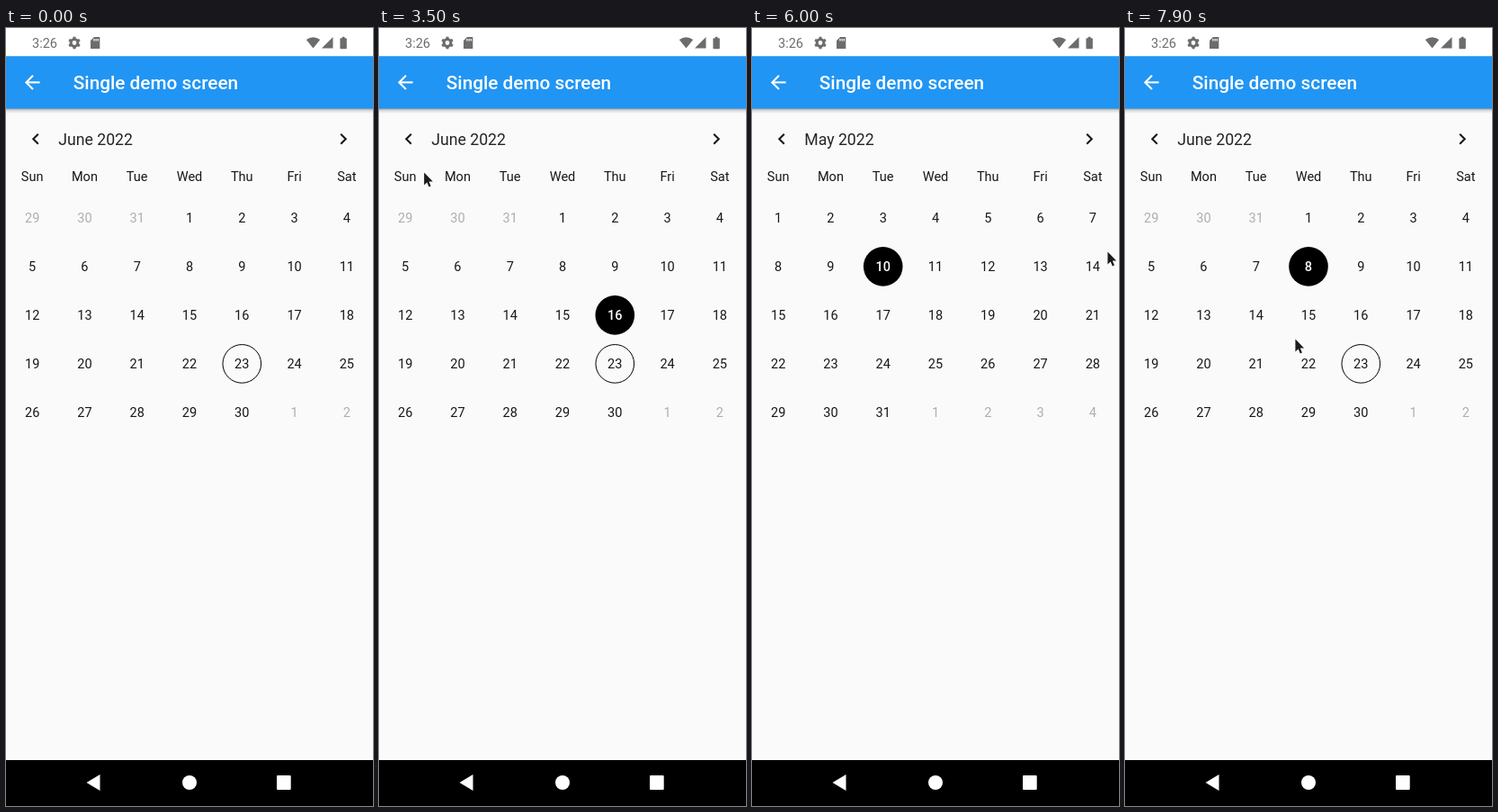
Recreate the animation shown at these times as an HTML page with a canvas. Size 408x864 px, loop 8000 ms.

```html
<!DOCTYPE html>
<html lang="en">
<head>
<meta charset="utf-8">
<title>Calendar demo</title>
<style>
html, body { margin: 0; width: 100%; height: 100%; overflow: hidden; background: #fafafa; }
canvas { display: block; width: 408px; height: 864px; }
</style>
</head>
<body>
<canvas id="stage"></canvas>
<script>
const W = 408, H = 864, LOOP = 8000, STEP = 100;
const DP = W / 392.7;
const COL = W / 7, ROW = 52 * DP, FIRST_ROW = 210.8, RADIUS = 21 * DP;
const BAR_TOP = 31.3, BAR_HEIGHT = 56 * DP, BAR_MID = BAR_TOP + BAR_HEIGHT / 2;
const HEADER_MID = 123.3, NAV_MID = 838;
const INK = '#181818', GREY = '#aeaeae', STATUS = '#6c6c6c', PAPER = '#fafafa';
const WEEK = ['Sun', 'Mon', 'Tue', 'Wed', 'Thu', 'Fri', 'Sat'];
const MONTHS = ['May', 'June', 'July'];
const TAP_SLIDE = 3783, DRAG = 6000, RELEASE = 6300;

const canvas = document.getElementById('stage');
const ctx = canvas.getContext('2d');
const ratio = window.devicePixelRatio || 1;
canvas.width = W * ratio;
canvas.height = H * ratio;

// Pointer strokes; bend is the sideways bulge relative to the stroke's length
const ENTER = { x: 398, y: 336 };
const STROKES = [
  { from: 300, to: 600, x: 146, y: 260, bend: 0 },
  { from: 1400, to: 2000, x: 262, y: 322, bend: 0.8 },
  { from: 2600, to: 3000, x: 112, y: 277, bend: -0.3 },
  { from: 3200, to: 3600, x: 29, y: 121, bend: 0 },
  { from: 4100, to: 4700, x: 136, y: 264, bend: -2.1 },
  { from: 5200, to: 5800, x: 395, y: 248, bend: 0.3 },
  { from: DRAG, to: RELEASE, x: 151, y: 437, bend: 0.1 },
  { from: RELEASE, to: 6700, x: 257, y: 274, bend: 0 },
  { from: 6700, to: 7100, x: 204, y: 267, bend: 0 },
  { from: 7500, to: 7900, x: 189, y: 345, bend: 0 }
];

const PICKS = [
  { month: 1, day: 7, on: 1050, off: 2150 },
  { month: 1, day: 16, on: 2150, off: 4750 },
  { month: 0, day: 10, on: 4750, off: 7300 },
  { month: 1, day: 8, on: 7300, off: LOOP }
];

const clamp = v => Math.max(0, Math.min(1, v));

function pointerAt(t) {
  let p = ENTER;
  for (const s of STROKES) {
    if (t < s.from) break;
    const u = clamp((t - s.from) / (s.to - s.from));
    const dx = s.x - p.x, dy = s.y - p.y;
    const bulge = 2 * u * (1 - u) * s.bend;
    p = { x: p.x + dx * u - dy * bulge, y: p.y + dy * u + dx * bulge };
  }
  return p;
}

// cubic-bezier(0, 0, .58, 1)
function easeOut(u) {
  let lo = 0, hi = 1;
  for (let i = 0; i < 20; i++) {
    const s = (lo + hi) / 2;
    if (1.74 * s * s * (1 - s) + s ** 3 < u) lo = s; else hi = s;
  }
  return 3 * lo * lo - 2 * lo ** 3;
}

// Month position: a button slide, then a drag released into a damped spring
function pageAt(t) {
  if (t < DRAG) return 1 - easeOut(clamp((t - TAP_SLIDE) / 300));
  const grabbed = pointerAt(DRAG).x;
  if (t <= RELEASE) return (grabbed - pointerAt(t).x) / W;
  const left = W - grabbed + pointerAt(RELEASE).x;
  const s = (t - RELEASE) / 1000, swing = 131;
  const rest = (left + swing) * Math.exp(-22 * s) - swing * Math.exp(-9.07 * s);
  return 1 - (Math.abs(rest) > 0.1 ? rest / W : 0);
}

// Centres text on y the way a line box does
function text(str, x, y, dp, color, weight = 400, align = 'left') {
  const size = dp * DP;
  ctx.font = `${weight} ${size}px Roboto, sans-serif`;
  ctx.textAlign = align;
  ctx.fillStyle = color;
  ctx.fillText(str, x, y + size * 0.345);
}

function disc(x, y, r, color) {
  ctx.beginPath();
  ctx.arc(x, y, r, 0, Math.PI * 2);
  ctx.fillStyle = color;
  ctx.fill();
}

function rect(x, y, w, h, color, r = 0) {
  ctx.beginPath();
  ctx.roundRect(x, y, w, h, r);
  ctx.fillStyle = color;
  ctx.fill();
}

function trace(...points) {
  ctx.beginPath();
  points.forEach(([x, y]) => ctx.lineTo(x, y));
}

function polygon(color, ...points) {
  trace(...points);
  ctx.fillStyle = color;
  ctx.fill();
}

function line(color, width, ...points) {
  trace(...points);
  ctx.strokeStyle = color;
  ctx.lineWidth = width;
  ctx.stroke();
}

// dir -1 points left, 1 points right
function chevron(x, y, arm, dir, color) {
  line(color, 2 * DP, [x - dir * arm, y - arm], [x, y], [x - dir * arm, y + arm]);
}

function statusIcons(y) {
  const x = 76;
  ctx.beginPath();
  ctx.arc(x, y, 3.9, 0, Math.PI * 2);
  ctx.strokeStyle = STATUS;
  ctx.lineWidth = 3;
  ctx.stroke();
  for (let i = 0; i < 6; i++) {
    const a = (i + 0.5) * Math.PI / 3, c = Math.cos(a), s = Math.sin(a);
    line(STATUS, 3, [x + 4.5 * c, y + 4.5 * s], [x + 6.8 * c, y + 6.8 * s]);
  }

  polygon(STATUS, [94, y - 2.5], [98, y - 6.5], [104.3, y - 6.5], [104.3, y + 6.5], [94, y + 6.5]);
  for (let i = 0; i < 3; i++) rect(97.3 + i * 2.2, y - 4.5, 1.2, 2.6, '#fff');

  const tip = y + 6;
  ctx.beginPath();
  ctx.moveTo(341.5, tip);
  ctx.lineTo(333.8, y - 3.5);
  ctx.quadraticCurveTo(341.5, y - 9, 349.2, y - 3.5);
  ctx.fillStyle = STATUS;
  ctx.fill();
  polygon(STATUS, [351, tip], [363.5, tip], [363.5, y - 6.5]);
  rect(373.7, y - 6.7, 2.8, 3, STATUS);
  rect(371.4, y - 5.3, 7.4, 12, STATUS, 1);
}

function drawMonth(index, left, t) {
  const month = 4 + index;
  const lead = new Date(2022, month, 1).getDay();
  const count = new Date(2022, month + 1, 0).getDate();
  const cells = Math.ceil((lead + count) / 7) * 7;
  WEEK.forEach((name, i) => text(name, left + COL * (i + 0.5), 165, 14, INK, 400, 'center'));
  for (let i = 0; i < cells; i++) {
    const day = i - lead + 1;
    const x = left + COL * (i % 7 + 0.5);
    const y = FIRST_ROW + ROW * Math.floor(i / 7);
    const inside = day > 0 && day <= count;
    const pick = PICKS.find(p => p.month === index && p.day === day);
    const picked = pick && t >= pick.on && t < pick.off;
    if (pick) {
      const fade = clamp((t - pick.on) / 100) - clamp((t - pick.off) / 100);
      if (fade > 0) disc(x, y, RADIUS, `rgba(0,0,0,${fade})`);
    }
    if (index === 1 && day === 23) {
      ctx.beginPath();
      ctx.arc(x, y, RADIUS - 0.5, 0, Math.PI * 2);
      ctx.strokeStyle = '#000';
      ctx.lineWidth = 1;
      ctx.stroke();
    }
    const color = picked ? PAPER : inside ? INK : GREY;
    text(new Date(2022, month, day).getDate(), x, y, 14, color, picked ? 500 : 400, 'center');
  }
}

function drawBars() {
  const bottom = BAR_TOP + BAR_HEIGHT;
  const shade = ctx.createLinearGradient(0, bottom, 0, bottom + 5.5);
  shade.addColorStop(0, 'rgba(0,0,0,.35)');
  shade.addColorStop(0.4, 'rgba(0,0,0,.12)');
  shade.addColorStop(1, 'rgba(0,0,0,0)');
  rect(0, bottom - 1, W, 6.5, shade);
  rect(0, 0, W, BAR_TOP + 1, '#fff');
  rect(0, BAR_TOP, W, BAR_HEIGHT, '#2195f3');
  line('#fff', 2 * DP, [23.3, BAR_MID], [37.6, BAR_MID]);
  chevron(22.4, BAR_MID, 7.6, -1, '#fff');
  text('Single demo screen', 74.8, BAR_MID + 0.4, 20, '#fff', 500);

  text('3:26', 29, 16.8, 14, STATUS);
  statusIcons(16.5);

  rect(0, 813, W, H - 813, '#000');
  polygon('#fff', [89.5, NAV_MID], [104.5, NAV_MID - 9], [104.5, NAV_MID + 9]);
  disc(W / 2, NAV_MID, 8, '#fff');
  rect(301, NAV_MID - 8, 15.7, 16, '#fff', 1);
}

function drawPointer({ x, y }) {
  const shape = new Path2D('M0 0V14L3.200 11 5.400 16 7.500 15 5.400 10.200H9.700z');
  ctx.save();
  ctx.translate(x + 0.4, y + 0.4);
  ctx.lineJoin = 'round';
  ctx.lineWidth = 1.5;
  ctx.strokeStyle = 'rgba(255,255,255,.6)';
  ctx.stroke(shape);
  ctx.fillStyle = '#1c1c1c';
  ctx.fill(shape);
  ctx.restore();
}

function draw(t) {
  ctx.setTransform(ratio, 0, 0, ratio, 0, 0);
  rect(0, 0, W, H, PAPER);

  const page = pageAt(t);
  const ripple = (t - TAP_SLIDE) / 400;
  if (ripple > 0 && ripple < 1) {
    const alpha = 0.05 * (1 - ripple);
    disc(33, HEADER_MID, 36 * clamp(0.6 + ripple * 1.5), `rgba(0,0,0,${alpha})`);
  }
  MONTHS.forEach((name, i) => {
    const left = (i - page) * W;
    if (Math.abs(left) < W) drawMonth(i, left, t);
  });
  chevron(30.3, HEADER_MID, 5.5, -1, INK);
  chevron(377.7, HEADER_MID, 5.5, 1, INK);
  text(MONTHS[Math.round(page)] + ' 2022', 58.3, HEADER_MID + 0.2, 17, '#262626');
  drawBars();

  if (t >= STROKES[0].from) drawPointer(pointerAt(t));
}

const start = performance.now();
function tick() {
  const t = (performance.now() - start) % LOOP;
  draw(Math.floor(t / STEP) * STEP);
  requestAnimationFrame(tick);
}
tick();
</script>
</body>
</html>
```
